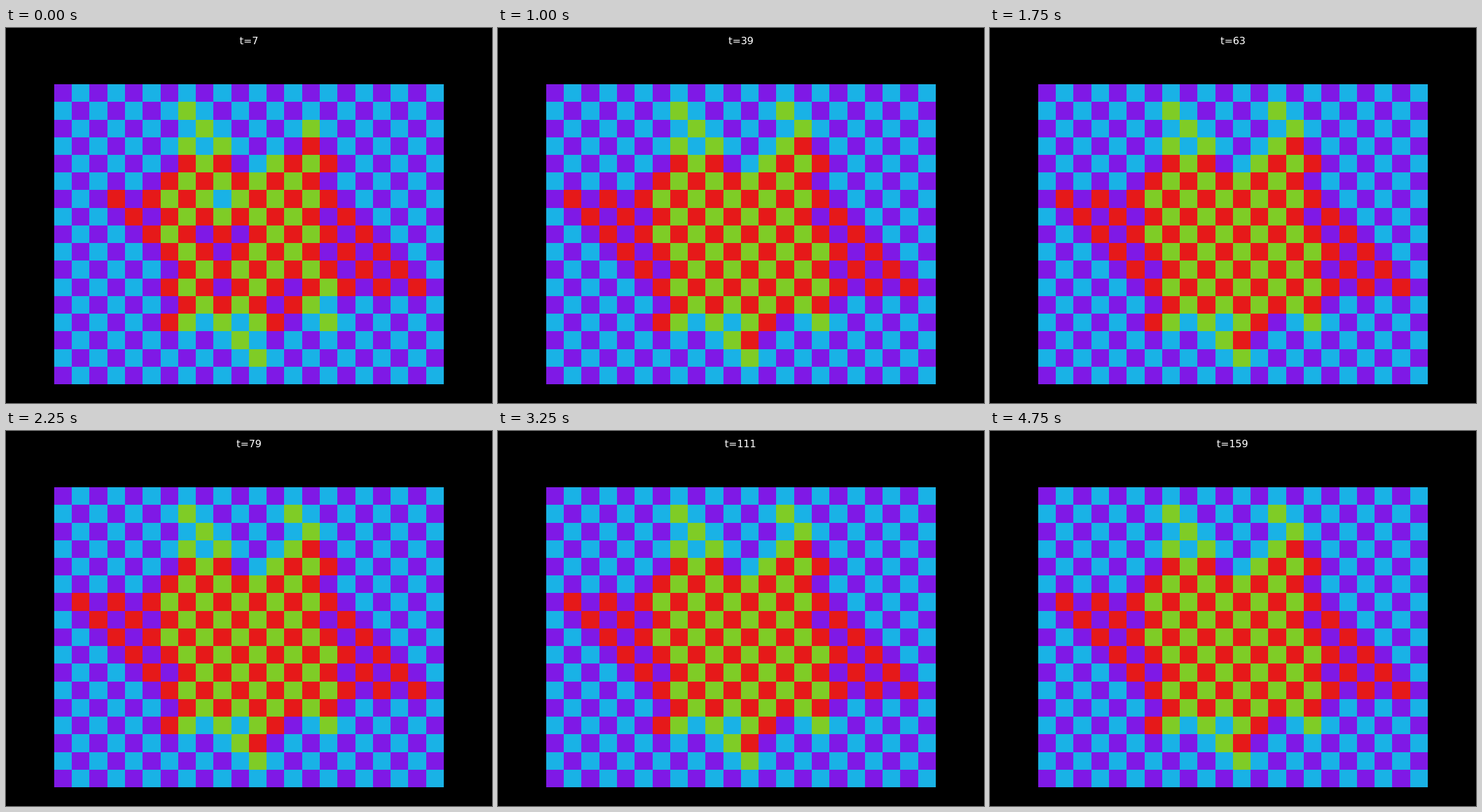
These frames come from a looping animation (776x600 px, 5000 ms). An HTML page:

```html
<!DOCTYPE html>
<html lang="en">
<head>
<meta charset="utf-8">
<title>Lattice growth</title>
<style>
  html, body { margin: 0; width: 100%; height: 100%; overflow: hidden; background: #000; }
  svg { display: block; }
  text { font: 16px "DejaVu Sans", sans-serif; fill: #fff; }
</style>
</head>
<body>
<svg id="stage" width="776" height="600" viewBox="0 0 776 600">
  <rect width="776" height="600"/>
  <g id="board" shape-rendering="crispEdges"></g>
  <text id="label" y="26"></text>
</svg>
<script>
const NS = "http://www.w3.org/2000/svg";
const COLS = 22, ROWS = 17;
const STEP = 250, STEPS = 20;

// Colours by checkerboard parity: [even, odd]
const IDLE = ["#7f19e6", "#19b2e6"];
const ACTIVE = ["#7fcc26", "#e61919"];

// Active columns of each row once the cluster is stable
const CLUSTER = [
  "", "7 13", "8 14", "7 9 13-14", "7-9 12-15", "6-14",
  "1 3 5-15", "2 4 6-14 16", "3 5-15 17", "4 6-16 18",
  "5 7-15 17 19", "6-16 18 20", "7-15", "6-7 9 11-12 15",
  "10-11", "11", ""
].map(expand);

// Columns, by row, that only join after the first step
const LATE = {
  1: [13], 3: [13], 6: [1, 9], 7: [2], 8: [3, 8, 10], 9: [4, 9, 15],
  10: [5], 11: [9, 13], 12: [12, 15], 14: [11]
};

// Label start by number of digits
const LABEL_X = [0, 373, 368, 362];

const board = document.getElementById("board");
const label = document.getElementById("label");
const lateCells = [];

function expand(spec) {
  const cols = new Set();
  for (const part of spec.split(" ").filter(Boolean)) {
    const [from, to = from] = part.split("-").map(Number);
    for (let c = from; c <= to; c++) cols.add(c);
  }
  return cols;
}

// Cell edges snapped to whole pixels
const edgeX = c => Math.round(77 + c * 622 / COLS - 0.06);
const edgeY = r => Math.round(90 + r * 480 / ROWS + 0.06);

function addCell(r, c) {
  const rect = document.createElementNS(NS, "rect");
  const x = edgeX(c), y = edgeY(r), parity = (r + c) % 2;
  const attrs = {
    x, y, width: edgeX(c + 1) - x, height: edgeY(r + 1) - y,
    fill: (CLUSTER[r].has(c) ? ACTIVE : IDLE)[parity]
  };
  for (const name in attrs) rect.setAttribute(name, attrs[name]);
  board.append(rect);
  if (LATE[r] && LATE[r].includes(c)) lateCells.push({ rect, parity });
}

for (let r = 0; r < ROWS; r++)
  for (let c = 0; c < COLS; c++) addCell(r, c);

let shown = -1;

function render(ms) {
  const step = Math.floor(ms / STEP) % STEPS;
  if (step === shown) return;
  shown = step;
  const count = String(7 + 8 * step);
  label.textContent = "t=" + count;
  label.setAttribute("x", LABEL_X[count.length]);
  const palette = step > 0 ? ACTIVE : IDLE;
  for (const { rect, parity } of lateCells) rect.setAttribute("fill", palette[parity]);
}

const start = performance.now();

function tick() {
  render(performance.now() - start);
  requestAnimationFrame(tick);
}
tick();
</script>
</body>
</html>
```
